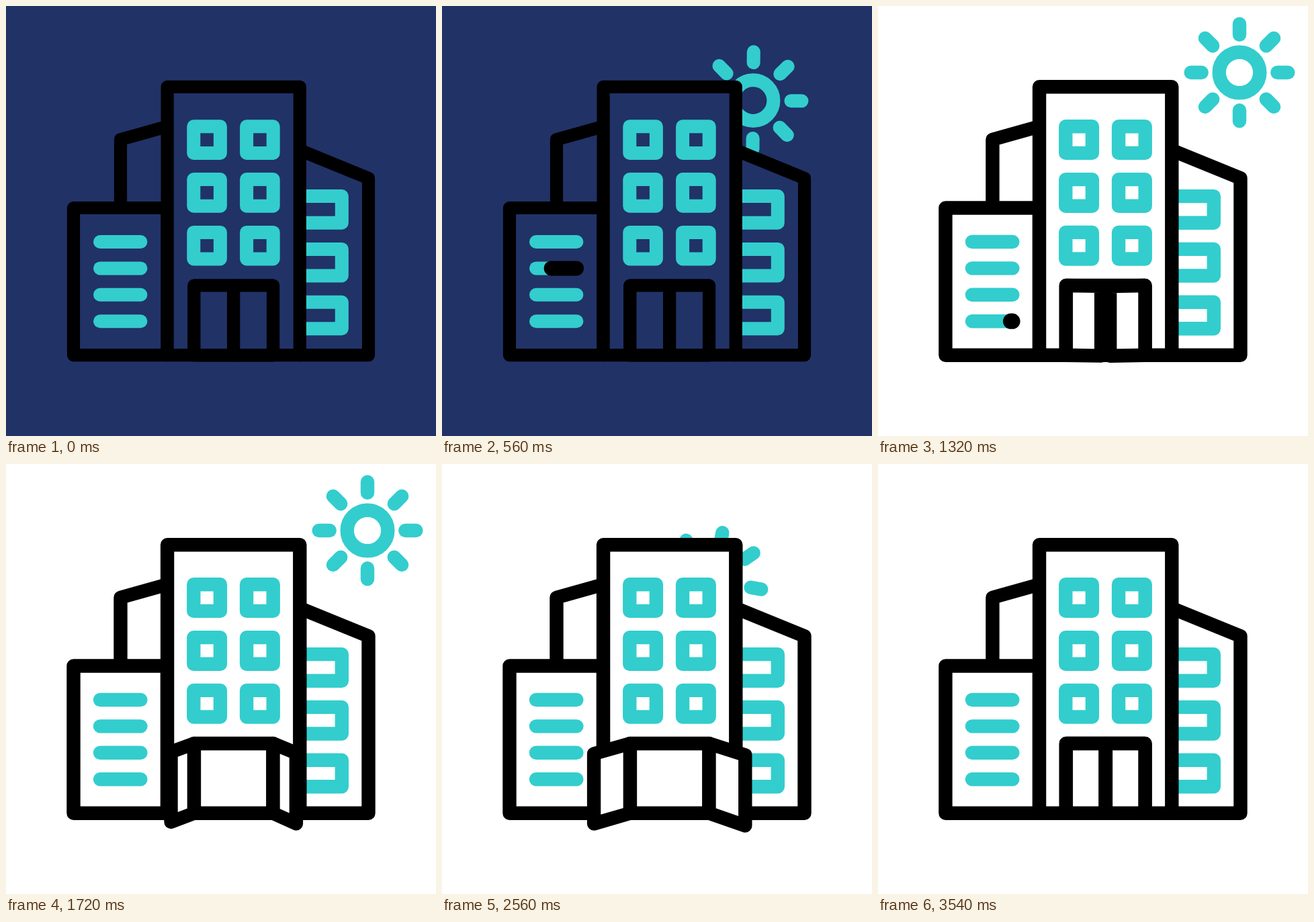
An HTML page with a canvas for the animation above (4.14 s loop, 640 by 640 pixels).

```html
<!DOCTYPE html>
<html lang="en">
<head>
<meta charset="utf-8">
<title>City block</title>
<style>
html, body { margin: 0; width: 100%; height: 100%; overflow: hidden; }
canvas { display: block; }
</style>
</head>
<body>
<canvas id="stage" width="640" height="640"></canvas>
<script>
const ctx = document.getElementById('stage').getContext('2d');
const LOOP = 4140, DAYBREAK = 1210;
const TEAL = '#33cdcd', BLACK = '#000', NIGHT = '#213267', DAY = '#fff';
const GROUND = 519.7, MIDDLE = 338.7, TOWER = 98.6, FLOOR = 78.8;
let bg, thick, outline;

const span = (t, from, to) => Math.min(1, Math.max(0, (t - from) / (to - from)));

// Cubic bezier easing with control points (a, 0) and (b, 1)
function ease(x, a, b) {
  let lo = 0, hi = 1;
  for (let i = 0; i < 24; i++) {
    const s = (lo + hi) / 2, r = 1 - s;
    if (3 * r * r * s * a + 3 * r * s * s * b + s * s * s < x) lo = s; else hi = s;
  }
  return lo * lo * (3 - 2 * lo);
}

const swing = (t, from, to) => ease(span(t, from, to), 1 / 3, 2 / 3);

function paint(path, color, width, fill) {
  if (fill) {
    ctx.fillStyle = fill;
    ctx.fill(path);
  }
  ctx.strokeStyle = color;
  ctx.lineWidth = width;
  ctx.stroke(path);
}

const line = (d, color, width, fill) => paint(new Path2D(d), color, width, fill);

// Rectangle given by its centre line
function box(x, y, right, bottom, color, width, fill) {
  line(`M${x} ${y}H${right}V${bottom}H${x}Z`, color, width, fill);
}

function drawWindow(x, y, halfWidth) {
  box(x - halfWidth, y - 19.8, x + halfWidth, y + 19.8, TEAL, thick);
}

// The sun rolls out from behind the tower and back along a straight line
function drawSun(t) {
  const hidden = t < 2000 ? 1 - ease(span(t, 0, 1188), .33, .4)
                          : ease(span(t, 2000, 2861), .18, .86);
  ctx.save();
  ctx.translate(538 - 202 * hidden, 99 + 112.3 * hidden);
  ctx.rotate(-hidden * Math.PI * 2 / 3);
  const disc = new Path2D();
  disc.arc(0, 0, 30.3, 0, 7);
  paint(disc, TEAL, thick);
  for (let i = 0; i < 8; i++) {
    line('M56.3 0H72.3', TEAL, thick);
    ctx.rotate(Math.PI / 4);
  }
  ctx.restore();
}

// A black dash runs along each stripe, in two pairs
function drawStripes(t) {
  for (let i = 0; i < 4; i++) {
    const y = 351 + FLOOR / 2 * i, start = 60 + 199 * (i + (i >> 1));
    const head = span(t, start, start + 280), tail = span(t, start + 196, start + 476);
    line(`M140 ${y}h60.4`, TEAL, thick);
    if (head > 0 && tail < 1)
      line(`M${140 + 60 * tail} ${y}H${140.01 + 60 * head}`, BLACK, outline + 2.8);
  }
}

function drawDoors(t) {
  const open = swing(t, 1222, 1900) - swing(t, 2910, 3560);
  box(MIDDLE - 58.8, 416, MIDDLE + 58.8, GROUND, BLACK, outline, bg);
  for (const side of [-1, 1]) {
    const hinge = MIDDLE + 58.8 * side, edge = MIDDLE + 112.6 * side * open;
    const top = 416 + (16.2 + side) * open, bottom = GROUND + (17.2 + 1.5 * side) * open;
    line(`M${hinge} 416L${edge} ${top}V${bottom}L${hinge} ${GROUND}Z`, BLACK, outline, bg);
  }
}

function draw(t) {
  const night = t < DAYBREAK;
  bg = night ? NIGHT : DAY;
  thick = night ? 20 : 20.4;
  outline = night ? 19.2 : 20.4;
  ctx.fillStyle = bg;
  ctx.fillRect(0, 0, 640, 640);
  ctx.lineCap = ctx.lineJoin = 'round';
  drawSun(t);

  line(`M437 214.5L539.5 256.3V${GROUND}H437`, BLACK, outline, bg);
  for (let i = 0; i < 3; i++) drawWindow(460, 302.9 + FLOOR * i, 39.8);

  line('M240 179.3L170.5 198.7V300.5', BLACK, outline);
  box(100.5, 300.5, 240, GROUND, BLACK, outline, bg);
  drawStripes(t);

  box(MIDDLE - TOWER, 120.3, MIDDLE + TOWER, GROUND, BLACK, outline, bg);
  for (let i = 0; i < 6; i++)
    drawWindow(299.1 + FLOOR * (i % 2), 199.1 + FLOOR * (i >> 1), 19.8);
  drawDoors(t);
}

const begin = performance.now();
function tick() {
  draw((performance.now() - begin) % LOOP);
  requestAnimationFrame(tick);
}
tick();
</script>
</body>
</html>
```
